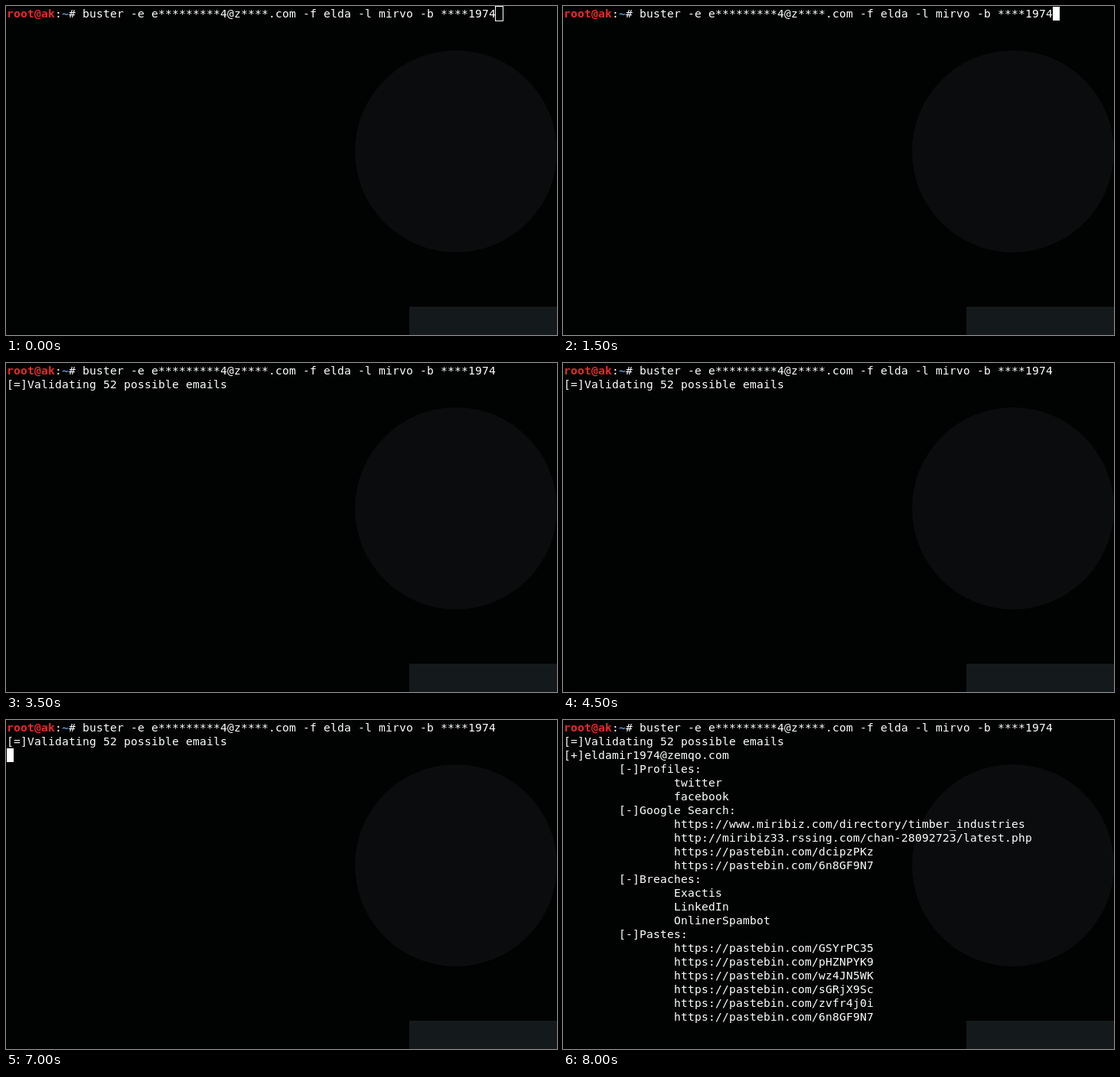
An HTML page for the animation above (8500 ms loop, 720x430 px).

```html
<!DOCTYPE html>
<html lang="en">
<head>
<meta charset="utf-8">
<title>Terminal session</title>
<style>
  html, body { margin: 0; width: 100%; height: 100%; overflow: hidden; background: #010202; }
  svg { display: block; width: 720px; height: 430px; }
  .term { font: 11pt "DejaVu Sans Mono", monospace; fill: #fff; white-space: pre; }
  .user { font-weight: bold; fill: #ef2929; }
  .path { font-weight: bold; fill: #5c93d0; }
  .size { font: 15px "Open Sans", "Noto Sans", sans-serif; fill: #f2f2f2; text-anchor: middle; }
</style>
</head>
<body>
<svg viewBox="0 0 720 430">
  <rect width="720" height="430" fill="#010202"/>
  <circle cx="588" cy="190" r="132" fill="#0b0c0d"/>
  <rect x="527" y="393" width="193" height="193" fill="#14191b"/>
  <g id="screen" class="term"></g>
  <rect id="block" width="9" height="18" fill="#fff"/>
  <rect id="hollow" x="639.5" y="0.5" width="10" height="19" fill="none" stroke="#fff"/>
  <g id="tooltip">
    <rect x="330.5" y="183.5" width="74" height="44" rx="10.5" fill="#2d2f2f" stroke="#4b4d4d"/>
    <text class="size" x="367.5" y="211">80&#x2009;×&#x2009;24</text>
  </g>
</svg>
<script>
const LOOP = 8500, CELL_W = 9, CELL_H = 18;
const $ = id => document.getElementById(id);

const prompt = '<tspan class="user">root@ak</tspan>:<tspan class="path">~</tspan># ';
const command = 'buster -e e*********4@z****.com -f elda -l mirvo -b ****1974';

// Each leading ">" indents the line by eight columns.
const report = `[+]eldamir1974@zemqo.com
>[-]Profiles:
>>twitter
>>facebook
>[-]Google Search:
>>https://www.miribiz.com/directory/timber_industries
>>http://miribiz33.rssing.com/chan-28092723/latest.php
>>https://pastebin.com/dcipzPKz
>>https://pastebin.com/6n8GF9N7
>[-]Breaches:
>>Exactis
>>LinkedIn
>>OnlinerSpambot
>[-]Pastes:
>>https://pastebin.com/GSYrPC35
>>https://pastebin.com/pHZNPYK9
>>https://pastebin.com/wz4JN5WK
>>https://pastebin.com/sGRjX9Sc
>>https://pastebin.com/zvfr4j0i
>>https://pastebin.com/6n8GF9N7`.split('\n');

// Characters sit on the terminal's cell grid.
function addLine(markup, row, indent = 0) {
  const line = document.createElementNS('http://www.w3.org/2000/svg', 'text');
  line.innerHTML = markup;
  const columns = [...line.textContent].map((_, i) => 1 + (indent * 8 + i) * CELL_W);
  line.setAttribute('x', columns.join(' '));
  line.setAttribute('y', 15 + row * CELL_H);
  $('screen').append(line);
  return line;
}

addLine(prompt + command, 0);
const status = addLine('[=]Validating 52 possible emails', 1);
const results = report.map((text, i) => {
  const indent = text.match(/^>*/)[0].length;
  return addLine(text.slice(indent), i + 2, indent);
});

const show = (node, on) => node.setAttribute('visibility', on ? 'visible' : 'hidden');

function cursorCell(t) {
  if (t < 2000) return [71, 0];
  if (t < 2500) return [0, 1];
  return [0, t < 7500 ? 2 : 22];
}

function cursorLit(t) {
  if (t < 3500) return true;
  const tick = Math.floor(t / 500);
  return t < 7500 ? tick % 2 === 0 : tick % 2 === 1;
}

function render(t) {
  const hollow = t < 500 || (t >= 1000 && t < 1500);
  const [col, row] = cursorCell(t);
  $('block').setAttribute('x', 1 + col * CELL_W);
  $('block').setAttribute('y', 1 + row * CELL_H);
  show($('block'), !hollow && cursorLit(t));
  show($('hollow'), hollow);
  show($('tooltip'), t >= 500 && t < 1500);
  show(status, t >= 2500);
  results.forEach(line => show(line, t >= 7500));
}

const start = performance.now();
function frame() {
  render((performance.now() - start) % LOOP);
  requestAnimationFrame(frame);
}
frame();
</script>
</body>
</html>
```
